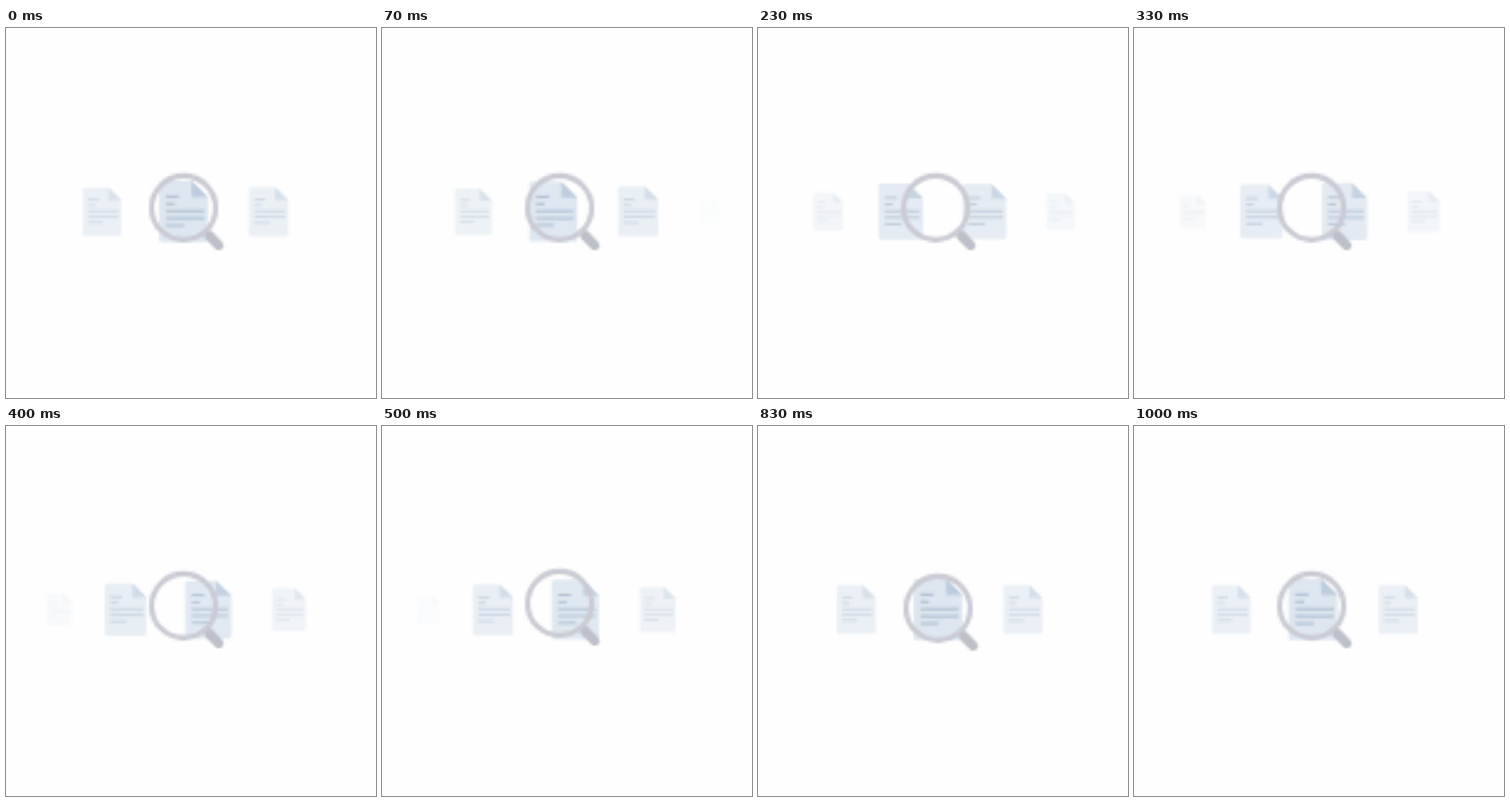
Write an HTML page with a canvas that moves like this. It is 500 px wide and 500 px high and loops after 1030 ms.

```html
<!DOCTYPE html>
<html lang="en">
<head>
<meta charset="utf-8">
<title>Searching documents</title>
<style>
  html, body { margin: 0; width: 100%; height: 100%; overflow: hidden; background: #fefefe; }
  canvas { display: block; width: 100vw; height: 100vh; }
</style>
</head>
<body>
<canvas id="stage" width="500" height="500"></canvas>
<script>
const LOOP = 1030, STEPS = 30, SIZE = 500, GRID = 150;
const BG = [254, 254, 254];
const PAPER = [222, 231, 240], FOLD = [188, 204, 220], INK = [172, 190, 209];
const RING = '#cacbd4', HANDLE = '#bdc0c9';

const out = document.getElementById('stage').getContext('2d');
// The picture is drawn on a coarse grid and enlarged for its soft edges.
const buffer = document.createElement('canvas');
buffer.width = buffer.height = GRID;
const g = buffer.getContext('2d');

const mix = (a, b, k) => a + (b - a) * k;
const tint = (color, alpha) =>
  `rgb(${color.map((c, i) => Math.round(mix(BG[i], c, alpha))).join(',')})`;

// cubic-bezier(.25, .1, .25, 1)
function ease(x) {
  if (x <= 0) return 0;
  if (x >= 1) return 1;
  let lo = 0, hi = 1, s = 0.5;
  for (let i = 0; i < 24; i++) {
    s = (lo + hi) / 2;
    const bx = 0.75 * s * (1 - s) + s * s * s;
    if (bx < x) lo = s; else hi = s;
  }
  return 0.3 * s * (1 - s) ** 2 + 3 * s * s * (1 - s) + s ** 3;
}

// Interpolates over slots -2 ... 2
function along(values, slot) {
  const p = Math.max(0, Math.min(4, slot + 2));
  const i = Math.min(3, Math.floor(p));
  return mix(values[i], values[i + 1], p - i);
}

function sheet(slot) {
  const alpha = along([0, 0.6, 1, 0.6, 0], slot);
  if (alpha <= 0) return;
  const scale = along([0.4, 0.79, 1, 0.8, 0.42], slot);
  const w = 66, h = 83, fold = 22, r = 4;

  g.save();
  g.translate(along([49, 131.5, 242, 357, 450], slot), 248);
  g.scale(scale, scale);
  g.translate(-w / 2, -h / 2);

  g.fillStyle = tint(PAPER, alpha);
  g.beginPath();
  g.moveTo(r, 0);
  g.lineTo(w - fold, 0);
  g.lineTo(w, fold);
  g.arcTo(w, h, w - r, h, r);
  g.arcTo(0, h, 0, h - r, r);
  g.arcTo(0, 0, r, 0, r);
  g.fill();

  g.fillStyle = tint(FOLD, alpha);
  g.beginPath();
  g.moveTo(w - fold, 0);
  g.lineTo(w, fold);
  g.lineTo(w - fold, fold);
  g.fill();

  g.fillStyle = tint(INK, alpha);
  [18, 12, 52, 52, 25].forEach((len, i) => g.fillRect(9, 19.5 + i * 9.8, len, 3.2));
  g.restore();
}

function magnifier(u) {
  const turn = Math.max(0, Math.min(1, (u - 0.45) / 0.55)) * Math.PI * 2;
  const unit = SIZE / GRID, radius = 0.78;
  const dx = Math.round(radius * (1 - Math.cos(turn)));
  const dy = Math.round(-radius * Math.sin(turn));

  g.save();
  g.translate(240 + dx * unit, 243 + dy * unit);
  g.lineCap = 'round';
  g.strokeStyle = HANDLE;
  g.lineWidth = 13;
  g.beginPath();
  g.moveTo(34, 37);
  g.lineTo(47.5, 50.5);
  g.stroke();

  g.strokeStyle = RING;
  g.lineWidth = 7;
  g.beginPath();
  g.arc(0, 0, 43.3, 0, Math.PI * 2);
  g.stroke();
  g.restore();
}

function draw(t) {
  const step = Math.floor((t + 4) / (100 / 3));
  const u = Math.min(1, (step + 1) / STEPS);
  const shift = ease(u);

  g.setTransform(1, 0, 0, 1, 0, 0);
  g.fillStyle = tint(BG, 1);
  g.fillRect(0, 0, GRID, GRID);
  g.scale(GRID / SIZE, GRID / SIZE);
  for (let slot = -1; slot <= 2; slot++) sheet(slot - shift);
  magnifier(u);

  out.imageSmoothingEnabled = true;
  out.drawImage(buffer, 0, 0, SIZE, SIZE);
}

const start = performance.now();
function tick() {
  draw((performance.now() - start) % LOOP);
  requestAnimationFrame(tick);
}
tick();
</script>
</body>
</html>
```
